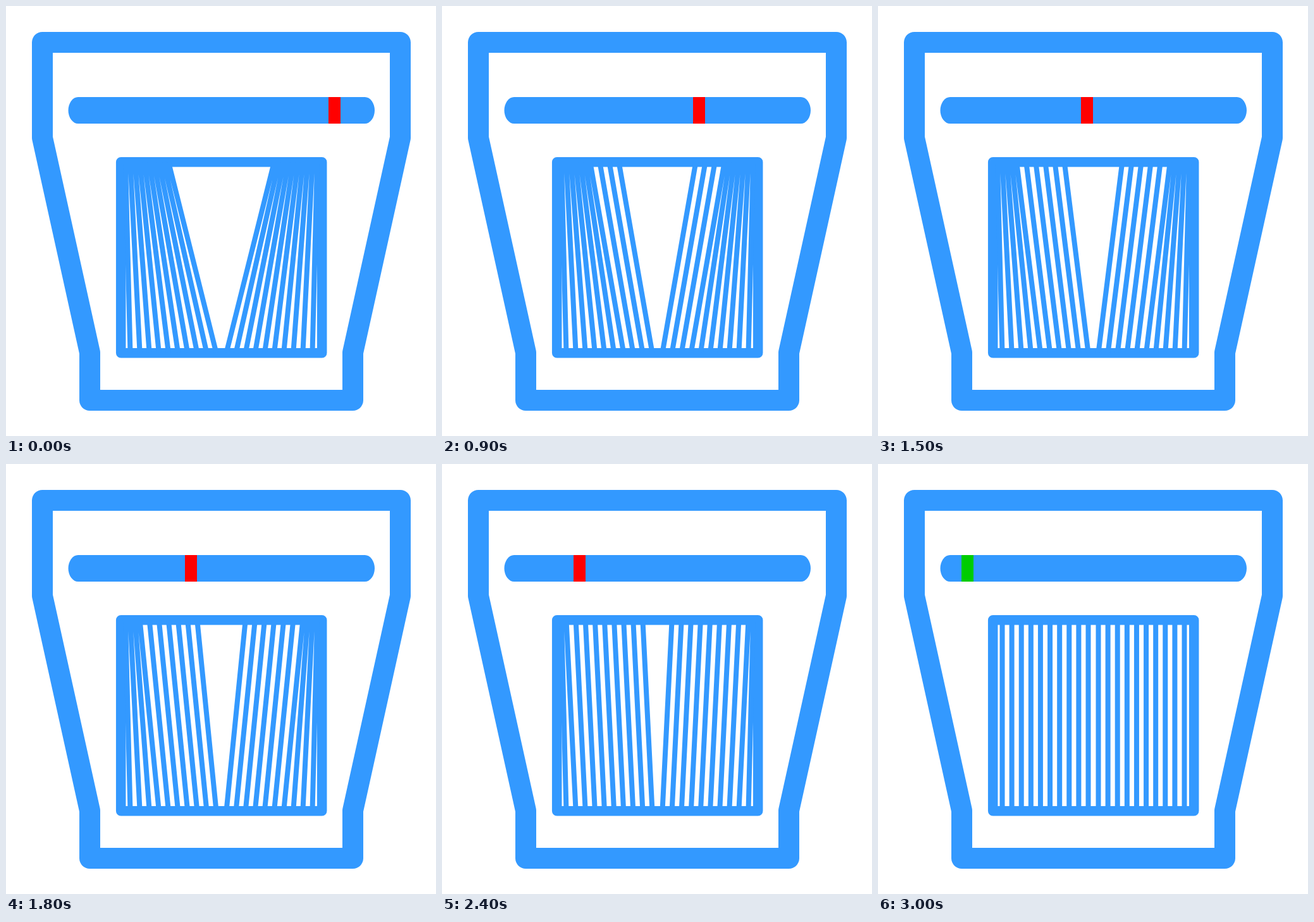
An HTML page that plays this animation: 680x680 px, repeating every 3300 ms.

```html
<!DOCTYPE html>
<html lang="en">
<head>
<meta charset="utf-8">
<title>Curtain</title>
<style>
html, body { margin: 0; width: 100%; height: 100%; overflow: hidden; background: #fff; }
svg { display: block; width: 100vw; height: 100vh; }
</style>
</head>
<body>
<svg viewBox="0 0 680 680">
  <g fill="none" stroke="#39f" stroke-linejoin="round">
    <path stroke-width="33" d="M57.5 57.5H623.5V208.5L548.5 548V623.5H132.5V548L57.5 208.5Z"/>
    <rect stroke-width="15.5" x="181.7" y="246.7" width="318" height="302"/>
    <path id="folds" stroke-width="8"/>
  </g>
  <rect x="98.5" y="144" width="484.5" height="42" rx="15.5" ry="21" fill="#39f"/>
  <rect id="marker" y="144" width="19" height="42"/>
</svg>
<script>
const STEP = 300, LAST = 10, COUNT = 10;
const UNIT = 680 / 90, MID = 340.5, TOP = 246.7, BOTTOM = 548.5;
const folds = document.getElementById('folds');
const marker = document.getElementById('marker');
let shown = -1;

function line(top, bottom) {
  return `M${top.toFixed(2)} ${TOP}L${bottom.toFixed(2)} ${BOTTOM}`;
}

function draw(step) {
  let d = '';
  for (let i = 0; i < COUNT; i++) {
    // Each fold can be pushed aside only as far as its place in the row allows.
    const bottom = 8 + (COUNT - 1 - i) * 2 * UNIT;
    const top = bottom + Math.min(i + 1, LAST - step) * UNIT;
    d += line(MID - top, MID - bottom) + line(MID + top, MID + bottom);
  }
  folds.setAttribute('d', d);
  marker.setAttribute('x', Math.round(510 - step * 5 * UNIT));
  marker.setAttribute('fill', step === LAST ? '#0c0' : '#f00');
}

function tick() {
  const step = Math.floor(performance.now() / STEP) % (LAST + 1);
  if (step !== shown) draw(shown = step);
  requestAnimationFrame(tick);
}
tick();
</script>
</body>
</html>
```
